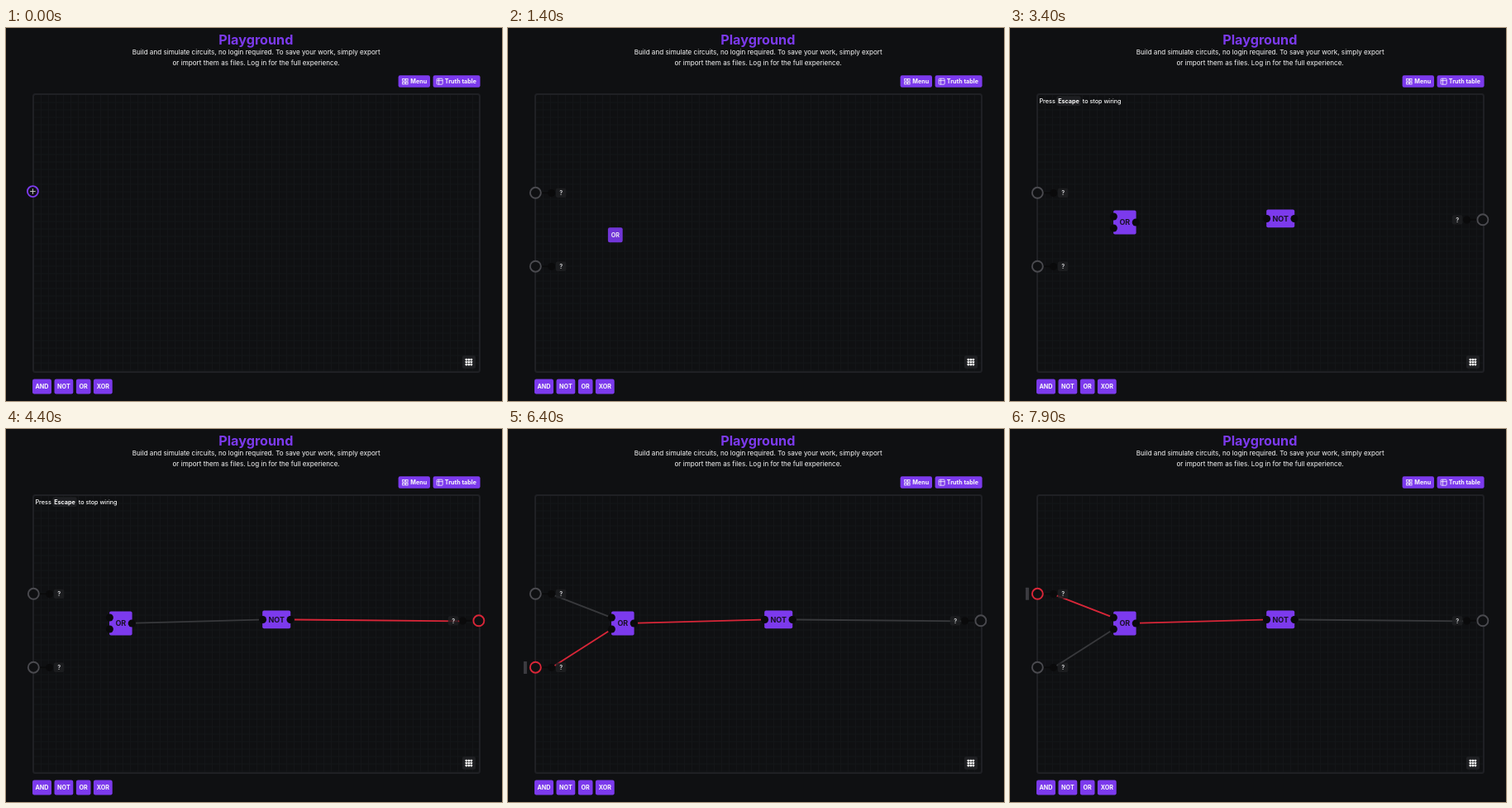
Recreate the animation shown at these times as an HTML page with a canvas. Size 600 by 451 pixels, loop 8 s.

```html
<!DOCTYPE html>
<html lang="en">
<head>
<meta charset="utf-8">
<title>Playground</title>
<style>
  html, body { margin: 0; width: 100%; height: 100%; overflow: hidden; background: #0f1012; }
  canvas { display: block; width: 600px; height: 451px; }
</style>
</head>
<body>
<canvas id="stage"></canvas>
<script>
const LOOP = 8000, STEP = 100;
const BG = '#0f1012', PURPLE = '#7c3aed', RED = '#d92638', GREY = '#38393c';
const RING = '#4a4a4f', PIN = '#0a0a0b', PANEL = '#1e1f22', WHITE = '#fafafa';

const canvas = document.getElementById('stage');
const dpr = window.devicePixelRatio || 1;
canvas.width = Math.round(600 * dpr);
canvas.height = Math.round(451 * dpr);
const g = canvas.getContext('2d');
g.scale(dpr, dpr);

function box(x, y, w, h, r, fill) {
  g.beginPath();
  g.roundRect(x, y, w, h, r);
  g.fillStyle = fill;
  g.fill();
}

function dot(x, y, r, fill, stroke) {
  g.beginPath();
  g.arc(x, y, r, 0, Math.PI * 2);
  g.fillStyle = fill;
  g.fill();
  if (stroke) {
    g.strokeStyle = stroke;
    g.lineWidth = 1.9;
    g.stroke();
  }
}

function line(x1, y1, x2, y2, color, width) {
  g.beginPath();
  g.moveTo(x1, y1);
  g.lineTo(x2, y2);
  g.strokeStyle = color;
  g.lineWidth = width;
  g.stroke();
}

// cy is the middle of the capitals
function text(str, x, cy, size, weight, color, align = 'center') {
  g.font = `${weight} ${size}px Inter, sans-serif`;
  g.textAlign = align;
  g.textBaseline = 'alphabetic';
  g.fillStyle = color;
  g.fillText(str, x, cy + size * 0.364);
}

function chip(label, cx, cy, w, alpha = 1) {
  g.globalAlpha = alpha;
  box(cx - w / 2, cy - 9, w, 18, 2.2, PURPLE);
  text(label, cx, cy, 7.2, 700, WHITE);
  g.globalAlpha = 1;
}

function gate(label, x, y, w, h, pins) {
  box(x, y, w, h, 2, PURPLE);
  for (const [px, py] of pins) dot(px, py, 4.5, PIN);
  text(label, x + w / 2, y + h / 2, 9, 700, '#1a1028');
}

// dir is 1 when the pin lies to the right of the ring
function terminal(x, y, dir, on) {
  line(x + dir * 7, y, x + dir * 19, y, PIN, 1.9);
  dot(x + dir * 19.3, y + 0.2, 4.5, PIN);
  g.globalAlpha = 0.8;
  box(x + dir * 30.8 - 6.3, y - 5.6, 12.6, 11.4, 2, PANEL);
  g.globalAlpha = 1;
  text('?', x + dir * 30.8, y + 0.2, 7.2, 600, '#e4e4e7');
  dot(x, y, 6.5, BG, on ? RED : RING);
}

function plus(x, y) {
  dot(x, y, 6.5, '#121216', PURPLE);
  line(x - 3.3, y, x + 3.3, y, '#c8c8cc', 1);
  line(x, y - 3.3, x, y + 3.3, '#c8c8cc', 1);
}

const handle = (x, y) => box(x, y - 7.5, 4, 15, 0.5, '#3b3b40');

// keys: [time, x, y]
function along(keys, t) {
  let a = keys[0];
  for (const b of keys) {
    if (t <= b[0]) {
      const k = b === a ? 0 : Math.max(0, (t - a[0]) / (b[0] - a[0]));
      return [a[1] + (b[1] - a[1]) * k, a[2] + (b[2] - a[2]) * k];
    }
    a = b;
  }
  return [a[1], a[2]];
}

function wire(from, to, start, end, t, on) {
  if (t < start) return;
  const k = Math.min(1, (t - start + STEP) / (end - start + STEP));
  const x = from[0] + (to[0] - from[0]) * k;
  const y = from[1] + (to[1] - from[1]) * k;
  line(from[0], from[1], x, y, on ? RED : GREY, 1.9);
}

const within = (t, spans) => spans.some(([a, b]) => t >= a && t < b);

function page() {
  g.fillStyle = BG;
  g.fillRect(0, 0, 600, 451);
  text('Playground', 302.3, 14.2, 16.2, 700, PURPLE);
  text('Build and simulate circuits, no login required. To save your work, simply export', 302.6, 29.3, 8.1, 400, WHITE);
  text('or import them as files. Log in for the full experience.', 302.6, 41.9, 8.1, 400, WHITE);

  box(474.6, 57.2, 38.4, 14.6, 2.2, PURPLE);
  box(516.6, 57.2, 57, 14.6, 2.2, PURPLE);
  text('Menu', 489.2, 64.6, 7.2, 700, WHITE, 'left');
  text('Truth table', 530.8, 64.6, 7.2, 700, WHITE, 'left');
  g.strokeStyle = WHITE;
  g.lineWidth = 0.8;
  for (const x of [479.6, 483.5])
    for (const y of [61.4, 65.3]) g.strokeRect(x, y, 2.6, 2.6);
  g.beginPath();
  g.roundRect(521.2, 61.2, 7, 7, 1);
  g.stroke();
  line(521.2, 63.6, 528.2, 63.6, WHITE, 0.8);
  line(523.6, 61.2, 523.6, 68.2, WHITE, 0.8);

  for (let x = 42.5; x < 572; x += 9) line(x, 81, x, 415, '#16171a', 0.9);
  for (let y = 90; y < 415; y += 9) line(34, y, 572, y, '#16171a', 0.9);
  g.beginPath();
  g.roundRect(33, 80, 540, 336, 2.5);
  g.strokeStyle = '#1f2024';
  g.lineWidth = 2;
  g.stroke();

  box(552, 396, 16, 15.8, 2, PANEL);
  for (let i = 0; i < 9; i++)
    box(555.7 + (i % 3) * 3, 399.8 + Math.floor(i / 3) * 3, 2.4, 2.4, 0.4, WHITE);

  chip('AND', 43.5, 433.5, 23);
  chip('NOT', 69.9, 433.5, 22.8);
  chip('OR', 93.7, 433.5, 17.6);
  chip('XOR', 117.3, 433.5, 22.8);
}

function draw(t) {
  page();

  const lowOn = t >= 6400 && t < 7500;
  const highOn = t >= 7000;
  const orOn = lowOn || highOn;
  const outOn = t >= 3800 && !orOn;

  if (t >= 2000) gate('OR', 125, 220.6, 27.6, 28.8, [[125.4, 228], [125.4, 242], [152.2, 235]]);
  if (t >= 2500) gate('NOT', 310.2, 219.6, 34, 21.6, [[310.6, 230.5], [344, 230.5]]);

  wire([349, 230.5], [549, 232.4], 3500, 3800, t, outOn);
  wire([157, 234.6], [306, 230.6], 4200, 4400, t, orOn);
  wire([56.5, 201.3], [121, 226.4], 4800, 5000, t, highOn);
  wire([56.2, 286.2], [121.2, 244.8], 5600, 5900, t, lowOn);

  if (t >= 100) terminal(33.3, 199.3, 1, highOn);
  if (t >= 500) terminal(33.3, 288.2, 1, lowOn);
  if (t >= 3000) terminal(571.9, 231.8, -1, outOn);

  if (t < 100) plus(32.4, 197.6);
  if (within(t, [[300, 500]])) plus(32.4, t < 400 ? 246 : 286.6);
  if (within(t, [[2900, 3000]])) plus(572, 231);

  if (within(t, [[100, 300], [6800, 7200], [7900, 8000]])) handle(18.9, 199.3);
  if (within(t, [[500, 700], [6200, 6600], [7300, 7700]])) handle(18.9, 288.4);
  if (within(t, [[3000, 3200]])) handle(583, 231.8);

  if (within(t, [[3400, 3900], [4100, 4500], [4700, 5100], [5500, 6000]])) {
    text('Press', 35.4, 88.2, 7.3, 500, WHITE, 'left');
    box(56.4, 82.2, 29.2, 11.8, 2, PANEL);
    text('Escape', 71, 88.2, 7.2, 700, WHITE);
    text('to stop wiring', 87.8, 88.2, 7.2, 500, WHITE, 'left');
  }

  if (within(t, [[1200, 2000]])) {
    const [x, y] = along([[1200, 95, 421], [1300, 112, 322], [1400, 129.8, 250.2], [1700, 135, 243], [1900, 137, 240]], t);
    chip('OR', x, y, 17.8, 0.9);
  }
  if (within(t, [[2100, 2500]])) {
    const [x, y] = along([[2100, 90, 418], [2200, 226, 318], [2300, 324.4, 253.4], [2400, 325.5, 246]], t);
    chip('NOT', x, y, 22.8, 0.9);
  }
}

const began = performance.now();
function tick() {
  const t = (performance.now() - began) % LOOP;
  draw(Math.floor(t / STEP) * STEP);
  requestAnimationFrame(tick);
}
tick();
</script>
</body>
</html>
```
